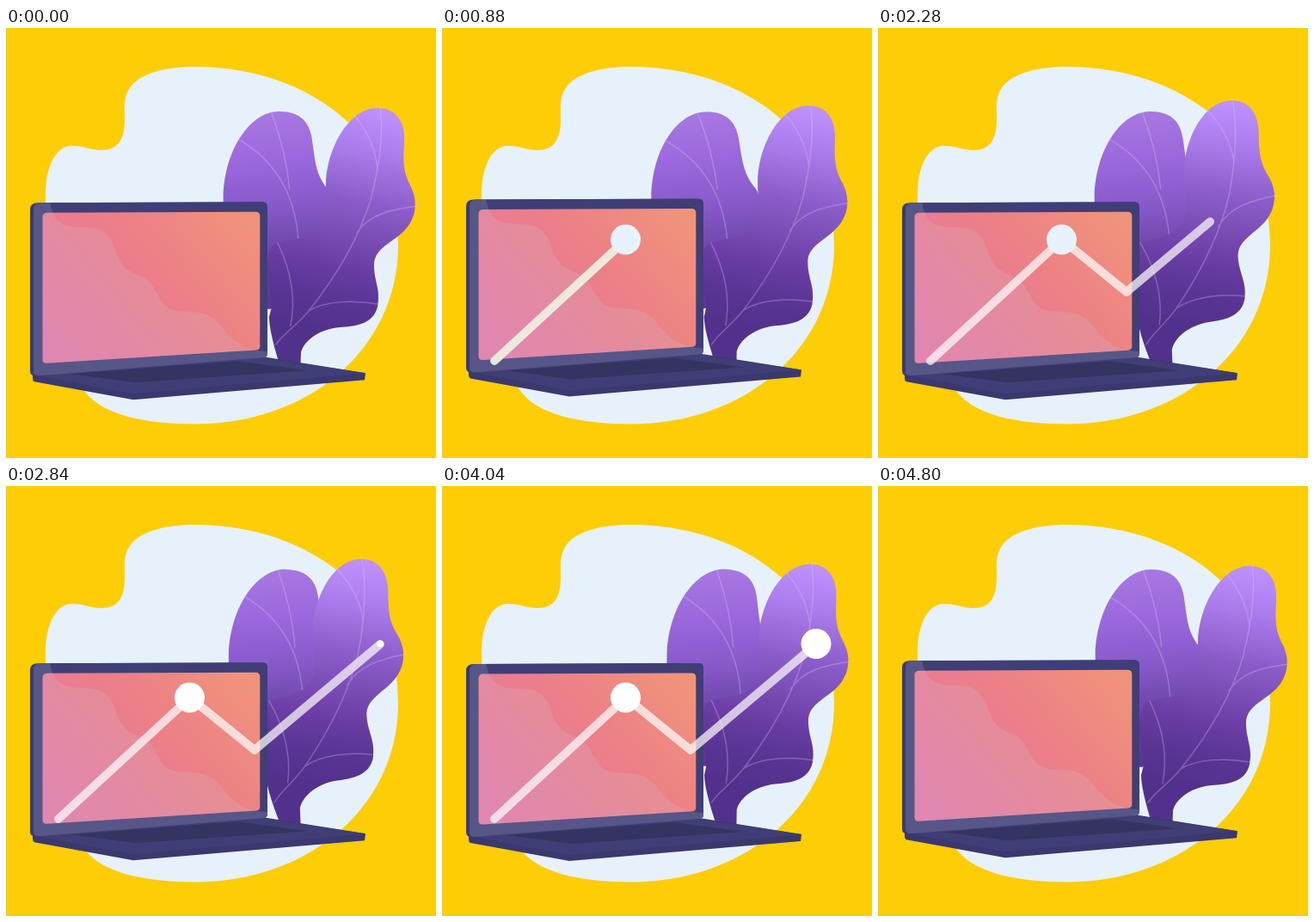
An HTML page for the animation above (4840 ms loop, 500 by 500 pixels).

```html
<!DOCTYPE html>
<html lang="en">
<head>
<meta charset="utf-8">
<title>Growth chart</title>
<style>
html, body { margin: 0; width: 100%; height: 100%; overflow: hidden; background: #fdcd06; }
svg { display: block; width: 100%; height: 100%; }
.veins { fill: none; stroke: #e3c8ff; stroke-opacity: .3; stroke-width: 1.5; stroke-linecap: round; }
#line { fill: none; stroke-width: 9.8; stroke-linecap: round; stroke-linejoin: round; }
</style>
</head>
<body>
<svg viewBox="0 0 500 500">
  <defs>
    <linearGradient id="leftFill" gradientUnits="userSpaceOnUse" x1="300" y1="97" x2="318" y2="325">
      <stop offset="0" stop-color="#a878e2"/>
      <stop offset=".25" stop-color="#9a68dc"/>
      <stop offset=".48" stop-color="#875aca"/>
      <stop offset=".66" stop-color="#734aaf"/>
      <stop offset="1" stop-color="#5a3593"/>
    </linearGradient>
    <linearGradient id="rightFill" gradientUnits="userSpaceOnUse" x1="425" y1="93" x2="370" y2="350">
      <stop offset="0" stop-color="#bf90ff"/>
      <stop offset=".2" stop-color="#a97ae9"/>
      <stop offset=".42" stop-color="#8a5cc9"/>
      <stop offset=".56" stop-color="#7a4eb6"/>
      <stop offset=".72" stop-color="#683ca2"/>
      <stop offset=".86" stop-color="#5a3594"/>
      <stop offset="1" stop-color="#52318c"/>
    </linearGradient>
    <linearGradient id="screenFill" gradientUnits="userSpaceOnUse" x1="75" y1="385" x2="275" y2="215">
      <stop offset="0" stop-color="#e578a6"/>
      <stop offset=".55" stop-color="#ec7f88"/>
      <stop offset="1" stop-color="#f0937b"/>
    </linearGradient>
    <clipPath id="lidClip"><path d="M32 211Q32 203 40 203L298 202Q304 202 304 208V378Q304 383 299 383L38 404Q32 404 32 399Z"/></clipPath>
  </defs>

  <rect width="500" height="500" fill="#fdcd06"/>
  <path fill="#e7f1fc" d="M220 45C332 45 456 108 456 252C456 375 350 460.500 220 460.500C160 460.500 108 449 90 420C66 380 46 260 46 193C46 165 56 137 77 137C91 137 98 142 111 142C130 142 138 130 138 106C138 92 136 80 145 68C158 51 190 45 220 45Z"/>

  <g id="leftLeaf">
    <path fill="url(#leftFill)" d="M318 97C341 97 353 108 356 128C360 155 360 169 374 187C394 215 360 300 314 325C300 330 285 325 270 300C256 265 253 225 253 195C255 140 285 97 318 97Z"/>
    <path class="veins" d="M270 129C312 153 336 190 340 245M309 98C319 125 327 155 330 187"/>
  </g>

  <g id="rightLeaf">
    <path fill="url(#rightFill)" d="M319 406L317 388C310 365 306 347 306 336L309 324C305 300 301 267 309 254C319 245 346 248 359 238C378 224 371 205 372 180C374 137 400 93 432 93C453 93 465 108 463 135C461 162 464 171 471 185C481 206 475 228 456 242C440 254 428 260 428 276C428 295 436 304 432 324C427 345 405 347 388 348C365 350 347 363 343 377L342 406Z"/>
    <path class="veins" d="M435 89C440 125 433 165 424 200C408 252 375 300 352 329C338 346 322 356 314 368M399 95C418 115 430 138 432 165M478 207C448 211 423 216 408 238M432 321C405 316 372 317 352 329M316 250C330 279 338 310 331 346"/>
  </g>

  <g id="laptop">
    <path fill="#3c3a70" d="M28 211Q28 203 37 203L298 202Q304 202 304 208V378Q304 383 299 383L36 405Q28 404 28 399Z"/>
    <path fill="#3a386e" d="M31 402L299 382L418 401L417 409L148 432L33 411Q31 410 31 407Z"/>
    <path fill="#403e76" d="M33 403L299 383L418 401L148 425Z"/>
    <path fill="#353460" d="M75 402L270 387L351 398L150 412Z"/>
    <g clip-path="url(#lidClip)">
      <rect x="28" y="200" width="280" height="208" fill="#403e76"/>
      <path fill="url(#screenFill)" d="M42.500 220Q42.500 214.500 48 214.500L290 213.500Q295.300 213.500 295.300 218.500V370Q295.300 374 291 374.300L48 389.500Q42.500 390 42.500 385Z"/>
      <path fill="#c8d0e0" fill-opacity=".16" d="M28 200H51C53 215 57 226 73 230C91 234 108 228 119 242C130 255 127 271 143 282C156 290 164 288 172 302C181 318 184 328 202 329C221 330 235 329 248 344C262 360 270 374 304 376V408H28Z"/>
    </g>
  </g>

  <path id="line" d="M61 387L214 246L289 307L435 184"/>
  <circle id="peak" cx="213.500" cy="246"/>
  <circle id="goal" cx="435" cy="183.500" fill="#fff"/>
</svg>
<script>
const PERIOD = 4840, CYCLE = 4800, DOT = 17.5;
const $ = id => document.getElementById(id);
const [leftLeaf, rightLeaf, laptop, line, peak, goal] =
  ["leftLeaf", "rightLeaf", "laptop", "line", "peak", "goal"].map($);

const total = line.getTotalLength();
const firstLeg = Math.hypot(153, 141);

// Eased progress from 0 to 1 between two times
const ease = (t, from, to) => {
  const u = Math.min(1, Math.max(0, (t - from) / (to - from)));
  return (1 - Math.cos(Math.PI * u)) / 2;
};

function draw(t) {
  const a = t / CYCLE * 2 * Math.PI;
  leftLeaf.setAttribute("transform", `rotate(${-1.47 * Math.sin(a + 0.03)} 330 600)`);
  rightLeaf.setAttribute("transform", `rotate(${-2.22 * (1 - Math.cos(a))} 309 392)`);
  laptop.setAttribute("transform", `translate(0 ${0.6 - 4.3 * Math.sin(a + 0.1)})`);

  const on = t < CYCLE;
  const drawn = firstLeg * ease(t, 40, 520) + (total - firstLeg) * ease(t, 1700, 2545);
  line.style.display = on && drawn > 0 ? "" : "none";
  line.style.strokeDasharray = `${drawn} ${total * 2}`;
  line.style.stroke = t < 1700 ? "rgba(240,238,222,.96)" : "rgba(255,255,255,.71)";
  peak.setAttribute("r", on ? DOT * ease(t, 460, 820) : 0);
  goal.setAttribute("r", on ? DOT * ease(t, 2720, 3120) : 0);
  peak.style.fill = t < 2560 ? "#e8f2fd" : "#fff";
}

const start = performance.now();
function tick() {
  draw((performance.now() - start) % PERIOD);
  requestAnimationFrame(tick);
}
tick();
</script>
</body>
</html>
```
